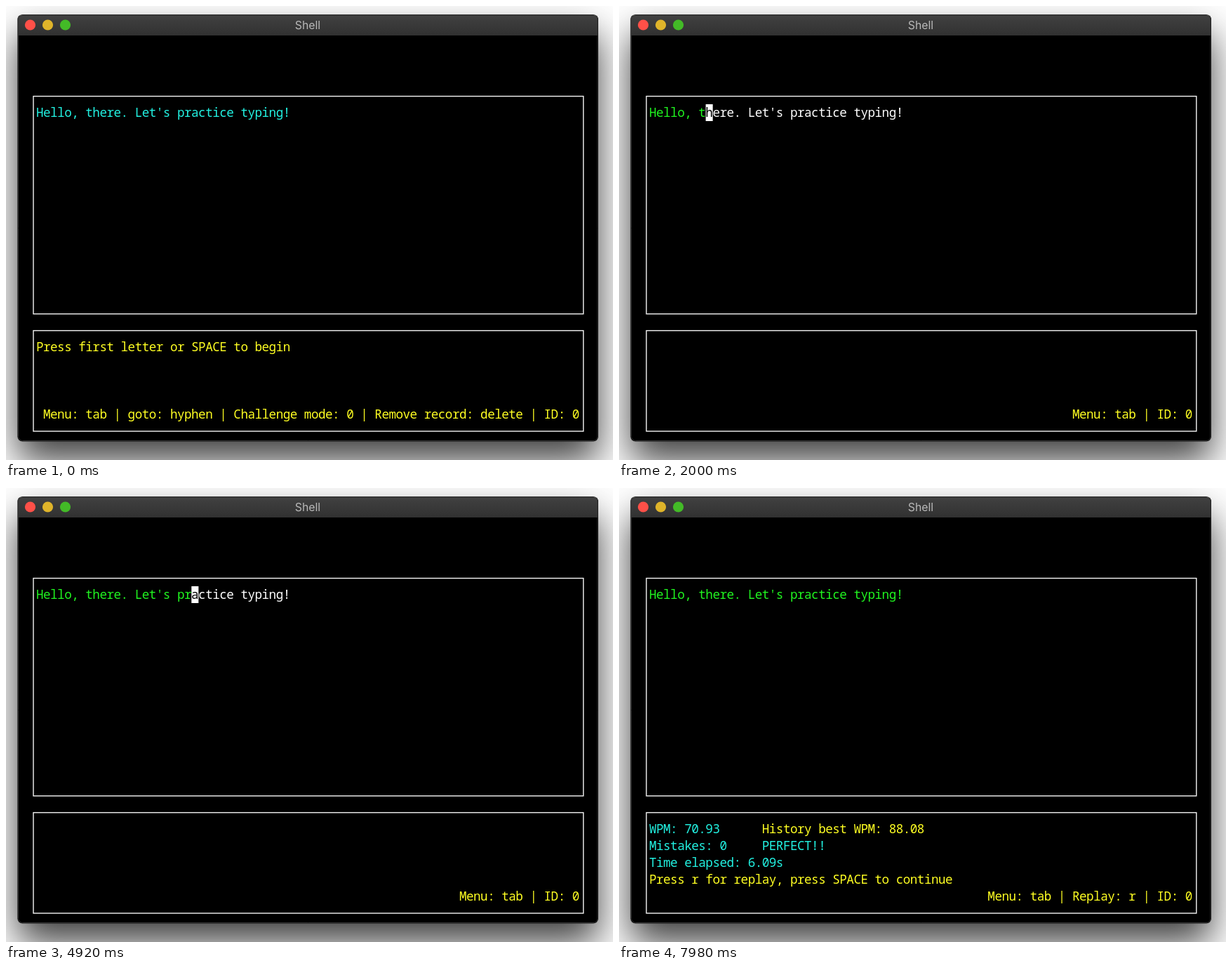
Animation, 865 px wide and 647 px high, one loop 8 s. Source, as an HTML page with a canvas:

```html
<!DOCTYPE html>
<html lang="en">
<head>
<meta charset="utf-8">
<title>Typing practice</title>
<style>
  html, body { margin: 0; width: 100%; height: 100%; overflow: hidden; background: #fff; }
  canvas { display: block; }
</style>
</head>
<body>
<canvas id="stage" width="865" height="647"></canvas>
<script>
const ctx = document.getElementById('stage').getContext('2d');
const LOOP = 8000;
const CELL_W = 10.05, CELL_H = 23.89, LEFT = 43.2, TOP = 140, COLUMNS = 77;
const CYAN = '#22f2e2', GREEN = '#20f520', YELLOW = '#ffff22', WHITE = '#fff';
const PHRASE = "Hello, there. Let's practice typing!";

// [time in ms, keys pressed]; the pace is even between points
const PACE = [[0, 0], [559, 0], [560, 1], [1340, 4.5], [2660, 11.5],
  [3620, 14.5], [4920, 22.5], [6860, 31.5], [7870, 36], [LOOP, 36]];

function keysAt(time) {
  const i = PACE.findIndex(([end]) => time < end);
  const [t0, k0] = PACE[i - 1], [t1, k1] = PACE[i];
  return Math.floor(k0 + (k1 - k0) * (time - t0) / (t1 - t0));
}

function write(text, column, row, color) {
  ctx.font = '500 17.6px "Noto Sans Mono", monospace';
  ctx.textAlign = 'center';
  ctx.fillStyle = color;
  [...text].forEach((char, i) =>
    ctx.fillText(char, LEFT + (column + i + 0.5) * CELL_W, TOP + row * CELL_H + 17.6));
}

function writeRight(text) {
  write(text, COLUMNS - text.length, 18, YELLOW);
}

function roundedWindow() {
  ctx.beginPath();
  ctx.roundRect(16.4, 12.3, 827.6, 608.2, 7);
}

function drawWindow() {
  ctx.fillStyle = '#fff';
  ctx.fillRect(0, 0, 865, 647);

  ctx.save();
  ctx.shadowColor = 'rgba(0, 0, 0, .75)';
  ctx.shadowBlur = 54;
  ctx.shadowOffsetY = 28;
  ctx.fillStyle = '#000';
  roundedWindow();
  ctx.fill();
  ctx.restore();

  ctx.save();
  roundedWindow();
  ctx.clip();
  const bar = ctx.createLinearGradient(0, 13, 0, 42);
  bar.addColorStop(0, '#414141');
  bar.addColorStop(1, '#313131');
  ctx.fillStyle = bar;
  ctx.fillRect(17, 13, 826.5, 29);
  ctx.fillStyle = '#5c5c56';
  ctx.fillRect(17, 13, 826.5, 1);
  ctx.restore();

  ctx.lineWidth = 1;
  ctx.strokeStyle = '#333';
  ctx.beginPath();
  ctx.roundRect(17.5, 13.5, 825.5, 606, 6);
  ctx.stroke();

  ['#ff5048', '#dfb42a', '#43ba27'].forEach((color, i) => {
    ctx.fillStyle = color;
    ctx.beginPath();
    ctx.arc(34.5 + i * 25, 27, 7.6, 0, Math.PI * 2);
    ctx.fill();
  });

  ctx.font = '15.8px Inter, sans-serif';
  ctx.textAlign = 'center';
  ctx.fillStyle = '#b9b9b9';
  ctx.fillText('Shell', 430, 33);

  ctx.lineWidth = 1.4;
  ctx.strokeStyle = '#f4f4f4';
  ctx.strokeRect(39, 128.6, 783.8, 310.2);
  ctx.strokeRect(39, 462.6, 783.8, 143.4);
}

function drawWelcome() {
  write(PHRASE, 0, 0, CYAN);
  write('Press first letter or SPACE to begin', 0, 14, YELLOW);
  writeRight('Menu: tab | goto: hyphen | Challenge mode: 0 | Remove record: delete | ID: 0');
}

function drawTyping(keys) {
  write(PHRASE.slice(0, keys), 0, 0, GREEN);
  ctx.fillStyle = WHITE;
  ctx.fillRect(LEFT + keys * CELL_W, TOP, CELL_W, 24);
  write(PHRASE[keys], keys, 0, '#000');
  write(PHRASE.slice(keys + 1), keys + 1, 0, WHITE);
  writeRight('Menu: tab | ID: 0');
}

function drawResult() {
  write(PHRASE, 0, 0, GREEN);
  write('WPM: 70.93', 0, 14, CYAN);
  write('History best WPM: 88.08', 16, 14, YELLOW);
  write('Mistakes: 0', 0, 15, CYAN);
  write('PERFECT!!', 16, 15, CYAN);
  write('Time elapsed: 6.09s', 0, 16, CYAN);
  write('Press r for replay, press SPACE to continue', 0, 17, YELLOW);
  writeRight('Menu: tab | Replay: r | ID: 0');
}

let shownKeys = -1;

function render() {
  const keys = keysAt(performance.now() % LOOP);
  if (keys !== shownKeys) {
    shownKeys = keys;
    drawWindow();
    if (keys === 0) drawWelcome();
    else if (keys < PHRASE.length) drawTyping(keys);
    else drawResult();
  }
  requestAnimationFrame(render);
}
render();
</script>
</body>
</html>
```
